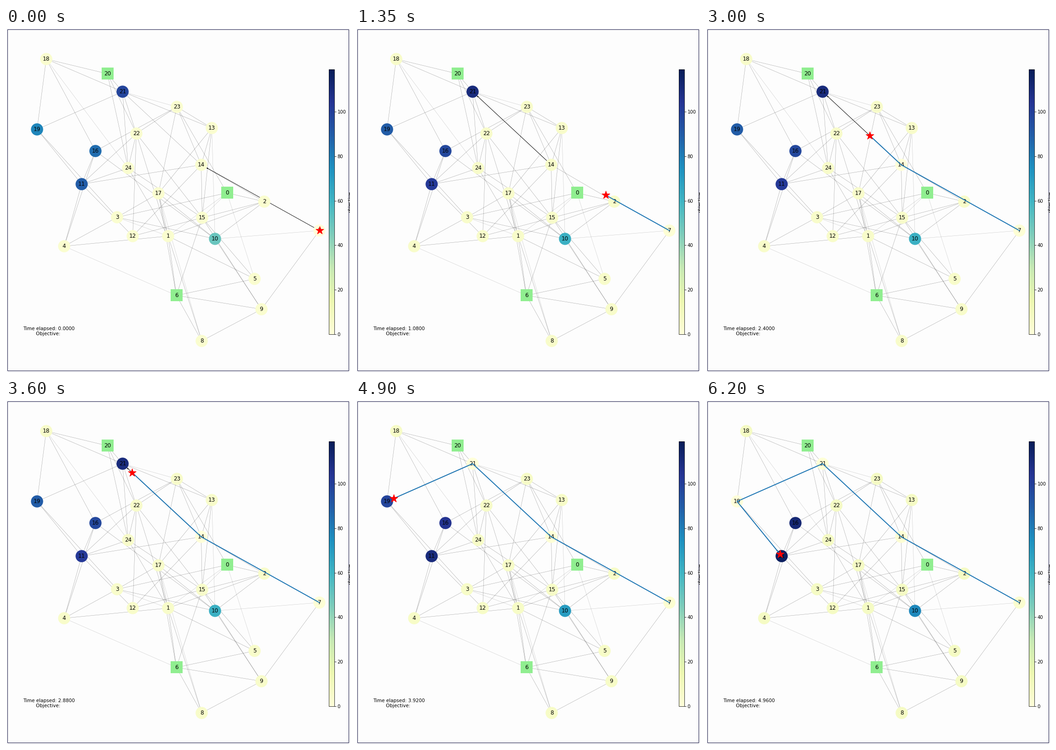
Animation, 748 px wide and 748 px high, one loop 6.25 s. Source, as a matplotlib script:

```python
import numpy as np
import matplotlib.pyplot as plt
from matplotlib.animation import FuncAnimation
from matplotlib.patches import FancyArrowPatch, Rectangle

SIZE, DPI = 748, 72
FRAMES, INTERVAL = 125, 50
STEP = 25          # frames per simulation step
DT = 0.04
VMAX = 119

POS = np.array([
    (480, 358), (352, 452), (561, 377), (241, 411), (126, 474),
    (540, 545), (370, 581), (681, 440), (425, 680), (555, 611),
    (454, 458), (164, 339), (275, 452), (447, 217), (424, 297),
    (426, 412), (194, 267), (331, 359), (87, 67), (67, 220),
    (220, 99), (253, 138), (283, 229), (371, 171), (265, 304),
])
DEPOTS = [0, 6, 20]
SITES = [n for n in range(len(POS)) if n not in DEPOTS]

# Roads, as chains of neighbouring nodes.
ROADS = [
    [7, 9, 8, 6, 9, 15, 6, 17, 1, 6, 5, 1, 8],
    [9, 10, 2, 0, 3, 4, 1, 2, 14, 15, 5],
    [0, 23, 22, 1, 24, 15, 2],
    [3, 10, 17, 3, 19, 11, 4, 16, 10],
    [12, 11, 14, 12, 15, 22, 12],
    [11, 16, 18, 19, 21, 18, 20, 21, 13, 14, 21, 22, 11, 24, 20, 22, 24, 21],
    [16, 23, 14], [15, 13, 17, 23, 13],
]
TRACKS = [[3, 1, 0, 5], [0, 15], [4, 6], [7, 10, 13], [8, 17], [18, 24],
          [21, 23]]

ROUTE = [7, 14, 21, 19, 11]
ARRIVAL = [0, 2, 3, 4, 5]      # in simulation steps
HOT = {10: 50, 11: 90, 16: 85, 19: 78, 21: 98}


def decision(step):
    """Moves chosen so far; the long first leg spans two steps."""
    return max(step - 1, min(step, 1))


def growth(step):
    return (decision(step) / 3) ** 0.75


def value(n, step):
    if n in ROUTE:
        arrival = ARRIVAL[ROUTE.index(n)]
        if step >= arrival:
            return 4 * (growth(step) - growth(arrival))
    return HOT[n] + 27 * growth(step) if n in HOT else 4 + 4 * growth(step)


def values(step):
    return np.array([value(n, step) for n in SITES])


def trail(t):
    """Points travelled up to time t, the last one being the vehicle."""
    stops = POS[ROUTE]
    now = [np.interp(t, ARRIVAL, stops[:, k]) for k in (0, 1)]
    passed = [p for p, t0 in zip(stops, ARRIVAL) if t0 <= t]
    return np.array(passed + [now])


def add_roads(ax, chains, alpha):
    for chain in chains:
        for ends in zip(chain, chain[1:]):
            ax.plot(*POS[list(ends)].T, color="black", lw=0.5, alpha=alpha,
                    zorder=1)


fig = plt.figure(figsize=(10.389, 10.389), dpi=DPI, facecolor="#fdfdfd")
ax = fig.add_axes([0, 0, 1, 1])
ax.axis("off")
ax.add_patch(Rectangle((3, 3), 742, 742, fill=False, ec="#101040", lw=1,
                       snap=False))

add_roads(ax, ROADS, 0.42)
add_roads(ax, TRACKS, 0.24)

nodes = ax.scatter(*POS[SITES].T, s=700, c=values(0), cmap="YlGnBu",
                   vmin=0, vmax=VMAX, linewidths=0, zorder=2)
ax.scatter(*POS[DEPOTS].T, s=700, c="lightgreen", marker="s",
           linewidths=0, zorder=2)
for n, (x, y) in enumerate(POS):
    ax.text(x, y, str(n), size=12, ha="center", va="center", zorder=3)

arrow = FancyArrowPatch((0, 0), (1, 1), arrowstyle="-|>", mutation_scale=5,
                        shrinkA=13, shrinkB=13, lw=0.9, color="black",
                        zorder=1.5)
ax.add_patch(arrow)
path, = ax.plot([], [], color="#1f77b4", lw=2, zorder=4)
star = ax.scatter([0], [0], s=18 ** 2, c="red", marker="*", lw=1, zorder=5)
info = ax.text(93, 659, "", size=10.4, ha="center", va="center", zorder=3)

# Whole coordinates fall on pixel centres.
ax.set(xlim=(-0.5, SIZE - 0.5), ylim=(SIZE - 0.5, -0.5))

cax = fig.add_axes([702.2 / SIZE, 82 / SIZE, 11.5 / SIZE, 576 / SIZE])
fig.colorbar(nodes, cax=cax, label="objective")


def update(i):
    step = i // STEP
    pts = trail(i / STEP)
    path.set_data(*pts.T)
    star.set_offsets(pts[-1:])
    nodes.set_array(values(step))
    leg = decision(step)
    arrow.set_positions(POS[ROUTE[leg]], POS[ROUTE[leg + 1]])
    info.set_text(f"Time elapsed: {i * DT:.4f}\nObjective: ")
    return path, star, nodes, arrow, info


anim = FuncAnimation(fig, update, frames=FRAMES, interval=INTERVAL,
                     repeat=True, repeat_delay=0, blit=False)
plt.show()
```
